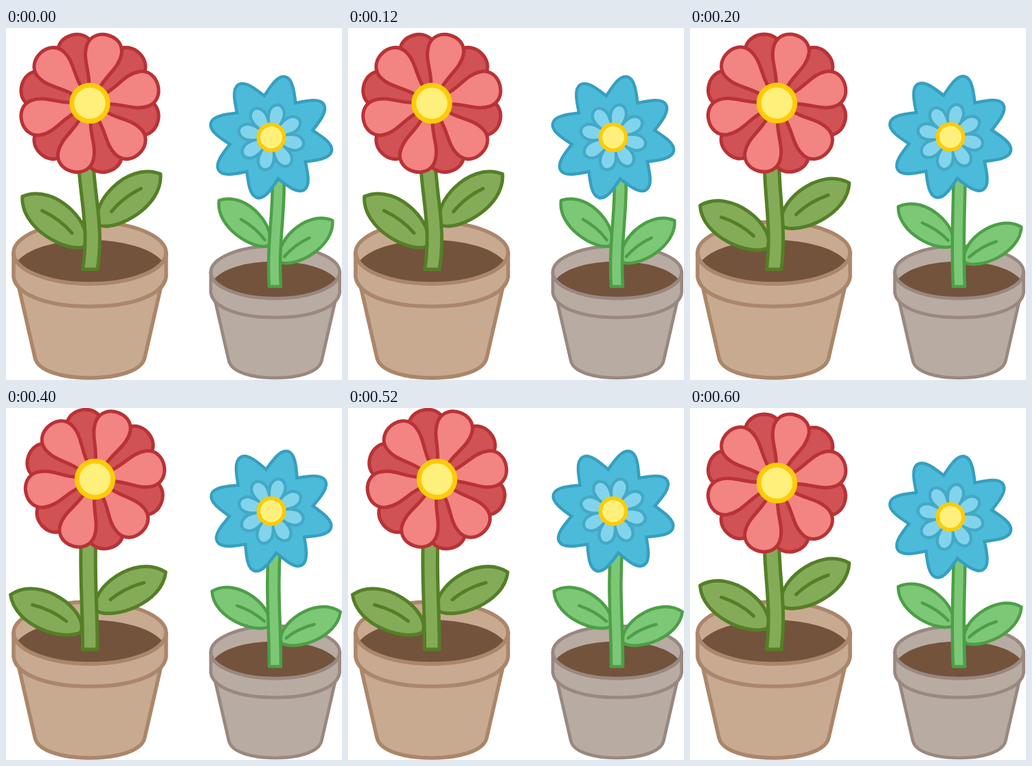
Recreate the animation shown at these times as an HTML page. Size 489 by 512 pixels, loop 800 ms.

```html
<!DOCTYPE html>
<html lang="en">
<head>
<meta charset="utf-8">
<title>Swaying flowers</title>
<style>
  html, body { margin: 0; width: 100%; height: 100%; overflow: hidden; background: #fff; }
  svg { display: block; width: 100%; height: 100%; stroke-linejoin: round; stroke-linecap: round; }
</style>
</head>
<body>
<svg id="stage" viewBox="0 0 489 512"></svg>
<script>
const HOLD = 200;
const STEPS = 4;

const path = (d, fill, line = 'none', width = 0) =>
  `<path d="${d}" fill="${fill}" stroke="${line}" stroke-width="${width}"/>`;
const group = (transform, body) => `<g transform="${transform}">${body}</g>`;
const ring = (count, offset, body) =>
  Array.from({ length: count }, (_, i) => group(`rotate(${offset + i * 360 / count})`, body)).join('');

// Pot centred on x = 0 and standing on y = 0.
function pot(x, scale, fill, line) {
  const draw = (d, color) => path(d, color, line, 5.5);
  return group(`translate(${x} 509) scale(${scale})`,
    draw('M-104 -135 L-80 -30 C-76 -9 -37 0 0 0 S76 -9 80 -30 L104 -135Z', fill) +
    draw('M-111 -182 V-147 C-107 -120 -60 -104 0 -104 S107 -120 111 -147 V-182Z', fill) +
    draw('M-111 -182 A111 45 0 0 1 111 -182 A111 45 0 0 1 -111 -182Z', fill) +
    path('M-106 -169 A111 45 0 0 1 106 -169 A111 45 0 0 1 -106 -169Z', '#73533c') +
    draw('M-111 -182 A111 45 0 0 0 111 -182', 'none'));
}

// side is 1 for a leaf growing right, -1 for left; rise is its angle above level.
function leaf(x, y, side, rise, style) {
  const scale = style.leaf / 115;
  const width = style.width / scale;
  return group(`translate(${x} ${y}) scale(${side * scale} ${scale}) rotate(${-rise})`,
    path('M0 0 C4 -32 90 -47 115 0 C88 38 14 23 0 0Z', style.fill, style.line, width) +
    path(`M${style.vein} -4 q26 -5 54 2`, 'none', style.line, width));
}

function stem({ x, y, foot, reach, hook, bow, half }, p, style) {
  const top = x + reach * Math.sin(p * Math.PI / 2);
  const bend = top + hook * (1 - 2 * p);
  const low = foot + bow * (1 - p * p);
  const drop = t => y + t * style.height;
  const d = `M${top - half} ${y} C${bend - half} ${drop(.36)} ${low - half} ${drop(.62)} ${foot - half} ${drop(1)}` +
    `H${foot + half} C${low + half} ${drop(.62)} ${bend + half} ${drop(.36)} ${top + half} ${y}Z`;
  return path(d, style.fill, style.line, style.width);
}

const eye = (r, width) =>
  `<circle r="${r}" fill="#fff07b" stroke="#fecb08" stroke-width="${width}"/>`;

// Merged petals: a wide line behind, then plain fills on top.
const rosette = (shape, fill, line, width) =>
  ring(8, 13, path(shape, line, line, width)) + ring(8, 13, path(shape, fill));

const redPetal = fill => path(
  'M-7 -22 C-12 -46 -28 -60 -26 -82 C-24 -96 -12 -102.5 0 -102.5 S24 -96 26 -82 C28 -60 12 -46 7 -22Z',
  fill, '#b83236', 5);
const redHead = ring(6, -15, redPetal('#d05254')) + ring(6, 15, redPetal('#f28482')) + eye(26.2, 7);

const blueHead =
  rosette('M0 0 L-23 -51 C-16 -70 -10 -88 0 -88 S16 -70 23 -51Z', '#4cbbd9', '#369fc0', 9) +
  rosette('M0 0 C-4 -16 -10 -26 -9 -36 C-8 -42 -4 -46 0 -46 S8 -42 9 -36 C10 -26 4 -16 0 0Z',
    '#82d4ec', '#43a9c6', 9) + eye(18.7, 5.4);

const red = {
  style: { fill: '#84ac58', line: '#557f27', width: 5, vein: 26, leaf: 116, height: 161 },
  stem: { x: 116, y: 190, foot: 122.3, reach: 4, hook: 2, bow: 10, half: 10.7 },
  head: { body: redHead, x: 122, y: 109.5, lean: 7.5, swing: .75, lift: 6, tilt: 4 },
  left: { x: 114, y: 318, rise: 39 },
  right: { x: 136, y: 287, rise: 40 },
  slip: { x: -5, y: 8 }
};
const blue = {
  style: { fill: '#7cc877', line: '#4d9f47', width: 4.5, vein: 11, leaf: 97, height: 176 },
  stem: { x: 395, y: 200, foot: 391.5, reach: -4, hook: 5, bow: -4.5, half: 8.5 },
  head: { body: blueHead, x: 386, y: 159, lean: 0, swing: -7, lift: 9, tilt: 2.5 },
  left: { x: 381, y: 317, rise: 43 },
  right: { x: 400, y: 341, rise: 39 },
  slip: { x: 1, y: 1 }
};

// p runs from 0 (leaves raised) to 1 (leaves lowered, bloom lifted).
function plant({ style, stem: stalk, head, left, right, slip }, p) {
  const droop = 16 * p - 5 * p * p;
  const late = p ** 4;
  const grow = ({ x, y, rise }, side) =>
    leaf(x + slip.x * p * p, y + slip.y * p * p, side, rise - droop, style);
  const x = head.x + head.lean * p + head.swing * Math.sin(p * Math.PI);
  const y = head.y - head.lift * late;
  return grow(left, -1) + grow(right, 1) + stem(stalk, p, style) +
    group(`translate(${x} ${y}) rotate(${head.tilt * late})`, head.body);
}

const stage = document.getElementById('stage');
const pots = pot(122, 1, '#c8aa91', '#ab866a') + pot(391.8, .845, '#b8aba2', '#998880');
let shown = -1;

function render(time) {
  const step = Math.floor(time / HOLD) % STEPS;
  if (step === shown) return;
  shown = step;
  const p = (1 - Math.cos(step * 2 * Math.PI / STEPS)) / 2;
  stage.innerHTML = pots + plant(red, p) + plant(blue, p);
}

const start = performance.now();
function tick() {
  render(performance.now() - start);
  requestAnimationFrame(tick);
}
tick();
</script>
</body>
</html>
```
